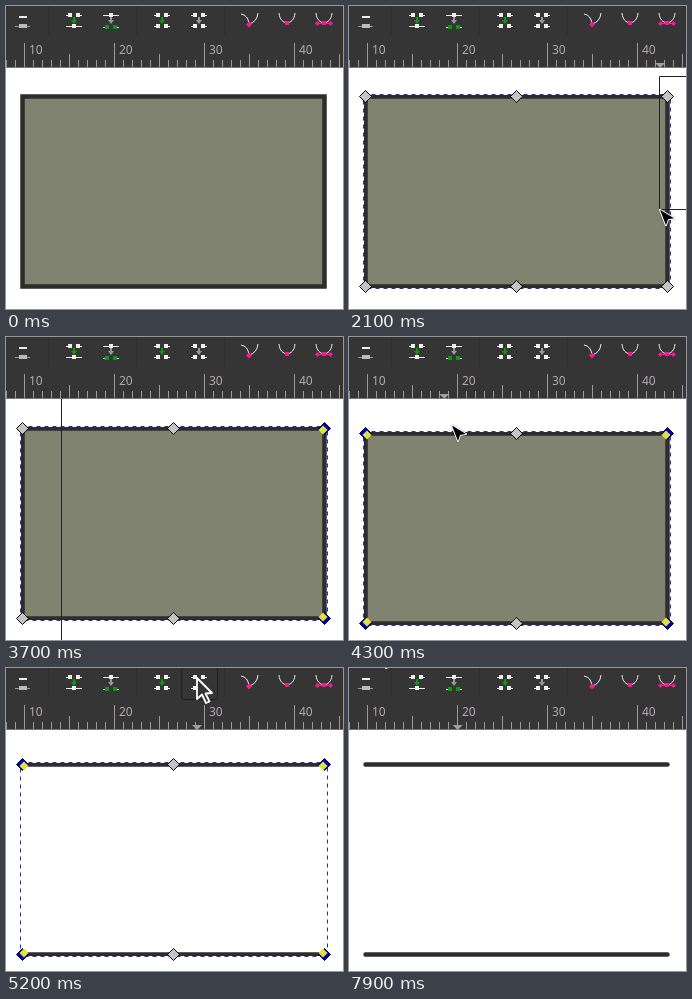
Write an HTML page with a canvas that moves like this. It is 337 px wide and 303 px high and loops after 8100 ms.

```html
<!DOCTYPE html>
<html lang="en">
<head>
<meta charset="utf-8">
<title>Deleting segments between nodes</title>
<style>
html, body { margin: 0; width: 100%; height: 100%; overflow: hidden; background: #fff; }
canvas { display: block; }
</style>
</head>
<body>
<canvas id="stage" width="337" height="303"></canvas>
<script>
const g = document.getElementById('stage').getContext('2d');
const LOOP = 8100, STEP = 100;
const LEFT = 16.5, RIGHT = 318.5, TOP = 90.5, BOTTOM = 280.5, MID = 167.5;
const BAR = '#353535', DARK = '#2d2d2d', LIGHT = '#eeeeee', GREY = '#999999';
const GREEN = '#0a9a0a', PINK = '#ff1493';

// pointer moves: first step, last step, destination
const moves = [
  [2, 3, 230, 130], [3, 5, 205, 180], [9, 12, 365, 160],
  [17, 18, 325, 72], [18, 23, 300, 290], [23, 26, 225, 190], [26, 27, 128, 190],
  [27, 30, -30, 310], [30, 33, 52, -60], [33, 37, 55, -60],
  [39, 40, 14, 103], [40, 46, 190, 72], [46, 48, 193, 12], [48, 50, 191, 10],
  [54, 58, 183, 181], [61, 63, 188, 192], [65, 68, 128, 150],
  [71, 75, 100, 14], [78, 79, 28, -25]
];

function pointer(k) {
  let x = 28, y = -99;
  for (const [from, to, toX, toY] of moves) {
    if (k <= from) break;
    const u = Math.min(1, (k - from) / (to - from));
    x += (toX - x) * u;
    y += (toY - y) * u;
  }
  return [x, y];
}

function box(x, y, w, h, color) {
  g.fillStyle = color;
  g.fillRect(x, y, w, h);
}

function stroke(color, width = 1) {
  g.strokeStyle = color;
  g.lineWidth = width;
  g.stroke();
}

function polygon(points, color) {
  g.beginPath();
  for (const [x, y] of points) g.lineTo(x, y);
  g.closePath();
  g.fillStyle = color;
  g.fill();
}

function line(x1, y1, x2, y2, color, width) {
  g.beginPath();
  g.moveTo(x1, y1);
  g.lineTo(x2, y2);
  stroke(color, width);
}

function diamond(x, y, r, color) {
  polygon([[x, y - r], [x + r, y], [x, y + r], [x - r, y]], color);
}

// icon row: two squares with outer stubs, or one square on a line
function row(x, y, pair, color = LIGHT) {
  box(x - 8, y, 16, 1, LIGHT);
  if (pair) box(x - 2, y, 4, 1, BAR);
  for (const dx of pair ? [-6, 2] : [-2]) box(x + dx, y - 2, 4, 4, color);
}

function arrowDown(x, color) {
  line(x, 11, x, 16, color, 2);
  polygon([[x - 3, 14], [x + 3, 14], [x, 18]], color);
}

function bowl(x) {
  g.beginPath();
  g.moveTo(x - 8, 7);
  g.bezierCurveTo(x - 7, 20, x + 7, 20, x + 8, 7);
  stroke(LIGHT);
}

function toolbar(hover) {
  box(0, 0, 337, 62, BAR);
  for (const x of [42, 130, 218]) box(x, 0, 1, 29, '#2f2f2f');
  if (hover) {
    g.beginPath();
    g.roundRect(175.5, -0.5, 36, 32, 3);
    stroke('#1e1e1e');
  }
  box(13, 10, 8, 2, LIGHT);
  box(9, 20, 15, 1, GREY);
  box(13, 18, 8, 4, '#bbbbbb');
  row(68, 9, true);
  arrowDown(68, GREEN);
  row(68, 20, false);
  row(105, 9, false);
  arrowDown(105, GREY);
  row(105, 21, true, GREEN);
  for (const [x, color] of [[156, GREEN], [193, GREY]]) {
    row(x, 9, true);
    arrowDown(x, color);
    row(x, 20, true);
  }
  g.beginPath();
  g.moveTo(235, 8);
  g.quadraticCurveTo(242, 9, 243, 18);
  g.quadraticCurveTo(251, 16, 252, 7);
  stroke(LIGHT);
  diamond(243, 18.5, 3, PINK);
  bowl(281);
  box(279, 15, 4, 4, PINK);
  bowl(318);
  box(310, 17, 16, 1, PINK);
  box(316, 15, 4, 4, PINK);
  for (const x of [311.5, 324.5]) diamond(x, 17.5, 2.5, PINK);
}

function ruler(mark) {
  g.font = '12px "Noto Sans", "Open Sans", sans-serif';
  for (let n = 8; n < 46; n++) {
    const x = 18 + (n - 10) * 9;
    const top = n % 10 === 0 ? 37 : n % 5 === 0 ? 48 : 54;
    box(x, top, 1, 62 - top, '#9a9a9a');
    if (n % 10 === 0) {
      g.fillStyle = '#b3a9b3';
      g.fillText(n, x + 5, 48);
    }
  }
  box(0, 61, 337, 1, '#777777');
  if (mark !== null) polygon([[mark - 5, 57], [mark + 5, 57], [mark, 62]], '#a0a0a0');
}

// the ruler mark trails the pointer and stays where it left the canvas
function marker(k) {
  if (pointer(k)[1] < -30) return null;
  while (pointer(k)[1] < 32) k--;
  return pointer(k - 1)[0] * 0.23 + pointer(k)[0] * 0.77;
}

function outline(cut, color, width) {
  g.beginPath();
  if (cut) {
    for (const y of [TOP, BOTTOM]) {
      g.moveTo(LEFT, y);
      g.lineTo(RIGHT, y);
    }
  } else {
    g.rect(LEFT, TOP, RIGHT - LEFT, BOTTOM - TOP);
  }
  stroke(color, width);
}

function shape(cut, flash) {
  if (!cut) box(LEFT, TOP, RIGHT - LEFT, BOTTOM - TOP, '#80836f');
  g.lineCap = cut ? 'round' : 'butt';
  outline(cut, DARK, 4.5);
  g.lineCap = 'butt';
  if (flash) outline(cut, '#ff0000', 1);
}

function node(x, y, picked) {
  diamond(x, y, 6, picked ? '#0000c8' : '#c4c4c4');
  stroke('#000000');
  if (picked) diamond(x + Math.sign(MID - x) * 1.5, y + (y === TOP ? 1.5 : -1.5), 4.5, '#e2e23c');
}

function selection(k) {
  g.beginPath();
  g.rect(14.5, 88.5, 307, 194);
  stroke('#ffffff');
  g.setLineDash([4, 4]);
  stroke('#2a2ac4');
  g.setLineDash([]);
  for (const y of [TOP, BOTTOM]) {
    node(LEFT, y, k >= 38 && k < 60);
    node(MID, y, false);
    node(RIGHT, y, k >= 24 && k < 60);
  }
}

function band(k) {
  const [x, y] = pointer(k).map(Math.round);
  g.beginPath();
  if (k > 18 && k < 24) g.rect(x + 0.5, 70.5, 40, y - 70);
  if (k > 30 && k < 38) g.rect(-30.5, y + 0.5, x + 31, 310 - y);
  stroke('#222222');
}

function cursor([x, y]) {
  const onBar = y < 62;
  const points = onBar
    ? [[0, 0], [0, 21], [5, 16.5], [9, 25], [12.5, 23.5], [8.5, 15.5], [15, 15]]
    : [[1, 1], [15, 9.5], [9, 10.5], [7, 16.5]];
  g.save();
  g.translate(x, y);
  g.lineJoin = 'round';
  polygon(points, onBar ? BAR : '#000000');
  if (onBar) {
    stroke('#ffffff', 1.8);
  } else {
    g.shadowColor = 'rgba(0,0,0,.35)';
    g.shadowBlur = 2;
    stroke('#ffffff', 2);
    g.shadowColor = 'transparent';
    polygon(points, '#000000');
  }
  g.restore();
}

function draw(now) {
  const k = Math.floor(now % LOOP / STEP);
  box(0, 0, 337, 303, '#ffffff');
  g.save();
  g.translate(0, k < 37 ? 0 : k < 38 ? 1 : 6);
  shape(k >= 52, k >= 4 && k < 9 || k >= 74 && k < 79);
  if (k >= 10 && k < 67) selection(k);
  g.restore();
  band(k);
  toolbar(k >= 47 && k < 56);
  ruler(marker(k));
  cursor(pointer(k));
  requestAnimationFrame(draw);
}
requestAnimationFrame(draw);
</script>
</body>
</html>
```
